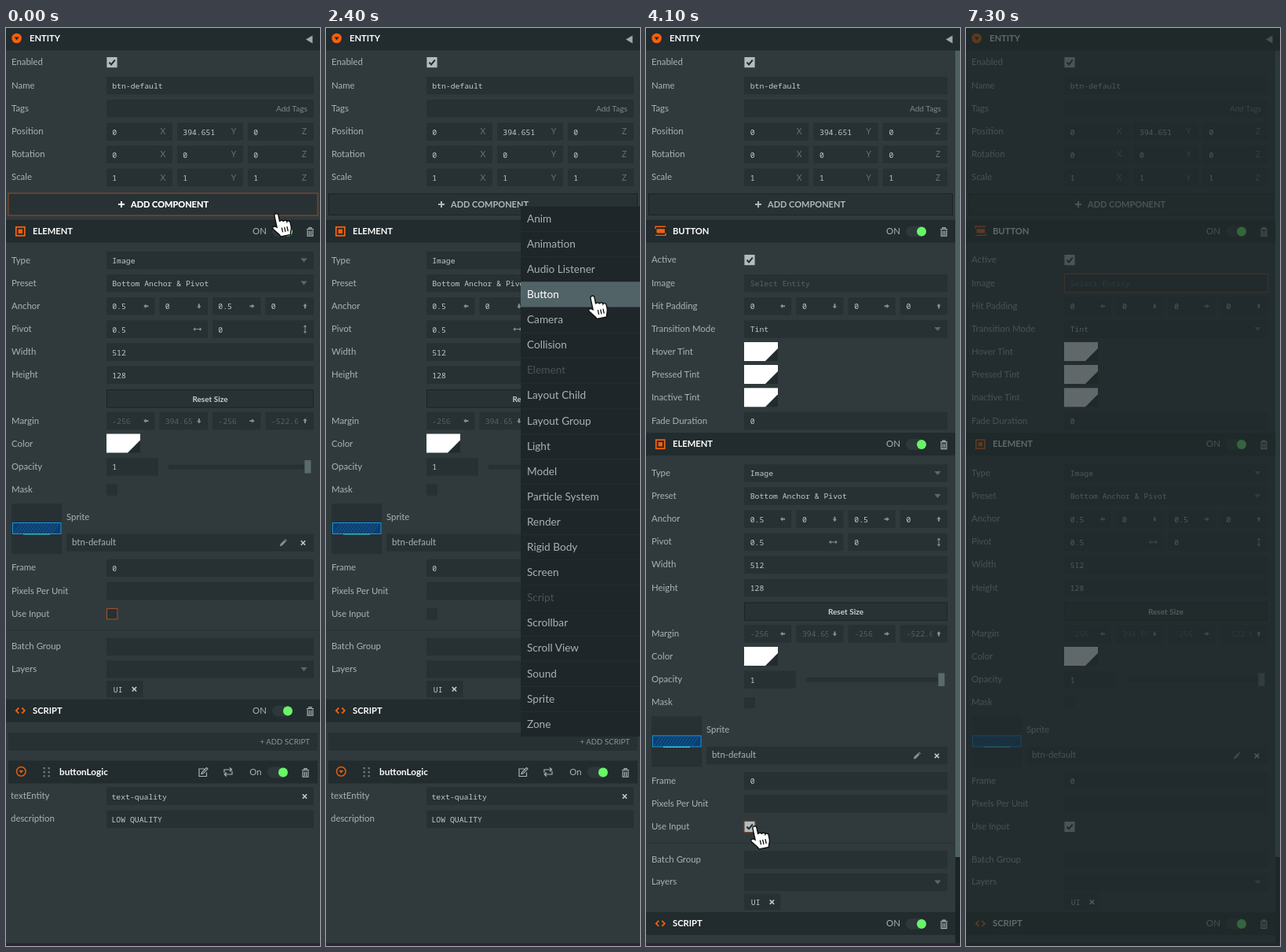
Animation of 400 by 1166 pixels, one loop 8 s. Source, as an HTML page:

```html
<!DOCTYPE html>
<html lang="en">
<head>
<meta charset="utf-8">
<title>Entity inspector</title>
<style>
  html, body { margin: 0; width: 100%; height: 100%; overflow: hidden; background: #303a3d; }
  svg { display: block; }
  text { font: 11.4px Lato, sans-serif; fill: #a9b1b3; white-space: pre; }
  .bold { font-weight: 700; fill: #fff; }
  .title { font-size: 11.2px; }
  .name { font-size: 11.7px; }
  .mono { font: 9.78px "Noto Sans Mono", monospace; fill: #c3cacc; }
  .faint { fill: #566264; }
  .small { font-size: 10.2px; fill: #7d888a; }
  .tiny { font-size: 9.7px; fill: #8b9597; }
  .unit { font-size: 10.5px; fill: #667274; }
  .reset { font-size: 10px; font-weight: 700; fill: #c8ced0; }
  .add { font-size: 11px; font-weight: 700; fill: #b1b8ba; }
  .item { font-size: 13.65px; }
  .off { fill: #485356; }
  .field { fill: #273032; }
  .head { fill: #222b2d; }
  .button { fill: #283234; stroke: #1b2325; }
  .ring { fill: none; stroke: #a4512a; }
  .line { fill: none; stroke: #a9b1b3; stroke-width: 1.2; }
  .plus { stroke: #b1b8ba; stroke-width: 2; }
  .cross { fill: none; stroke: #c3cacc; stroke-width: 1.6; }
  .glyph { fill: #869193; }
  .orange { fill: #f4600c; }
  .orangeLine { fill: none; stroke: #f4600c; stroke-width: 1.8; }
  .thin { stroke-width: 1.4; }
  .drop { fill: #5a6769; }
  .tick { fill: none; stroke: #222b2d; stroke-width: 2; }
  .hot { fill: #fff; }
  .plus.hot { stroke: #fff; }
</style>
</head>
<body>
<svg id="stage" width="400" height="1166" viewBox="0 0 400 1166"></svg>
<script>
const LOOP = 8000, STEP = 100, ROW = 32.1, MENU_TOP = 226;
const ITEMS = ['Anim', 'Animation', 'Audio Listener', 'Button', 'Camera', 'Collision', 'Element',
  'Layout Child', 'Layout Group', 'Light', 'Model', 'Particle System', 'Render', 'Rigid Body',
  'Screen', 'Script', 'Scrollbar', 'Scroll View', 'Sound', 'Sprite', 'Zone'];

const ICON = {
  arrow: 'M-3.2 0L0-2.7V-1H3V1H0V2.7Z',
  both: 'M-5.5 0L-2.8-2.3V-.5H2.8V-2.3L5.5 0L2.8 2.3V.5H-2.8V2.3Z',
  drop: 'M-4.2-2.5H4.2L0 2.5Z',
  cross: 'M-2.7-2.7L2.7 2.7M2.7-2.7L-2.7 2.7',
  trash: 'M-4.5-3.5H4.5M-1.6-3.5V-5.3H1.6V-3.5M-3.4-2.5V5.2H3.4V-2.5M-1.1-1.5V4M1.1-1.5V4',
  pencil: 'M-4.2 4.2L-3.5 1.4L1.4-3.5L3.5-1.4L-1.4 3.5ZM2-4.1L2.9-5L5-2.9L4.1-2Z',
  edit: 'M2-4.5H-5V5H4.5V0M-2 2L-1.5 0L4.5-6L6-4.5L0 1.5Z',
  swap: 'M-5 1V-3H4M2-5.5L4.7-3L2-.5M5-1V3H-4M-2 .5L-4.7 3L-2 5.5',
  code: 'M-2-3.5L-5.5 0L-2 3.5M2-3.5L5.5 0L2 3.5',
  bracket: 'M-6-2V-5.5H6V-2M-6 2V5.5H6V2',
  tick: 'M-3.6 0L-1 2.8L3.8-3',
  plus: 'M-4 0H4M0-4V4',
  hand: 'M-2.3 2C-2.3-.9 2.3-.9 2.3 2V9.8C2.9 8 6.5 8.2 6.5 10.6C7.3 8.8 10.5 9.2 10.5 11.6' +
    'C11.3 10.4 14 11 14 13.4V18C14 22 12 23 11.4 27H0C-1 23.5-4 21-6.6 17.2C-8.6 14.2-5.4 12.4-2.3 15.4Z',
  resize: 'M-14 0L-5-10V-3.2H5V-10L14 0L5 10V3.2H-5V10Z'
};
const TURN = { l: 0, u: 90, r: 180, d: 270, h: 0, v: 90 };

const text = (x, y, s, cls = '', anchor = 'start') =>
  `<text x="${x}" y="${y + 4.1}" class="${cls}" text-anchor="${anchor}">${s}</text>`;
const mono = (x, y, s, cls = '') => text(x, y + .4, s, 'mono ' + cls);
const rect = (x, y, w, h, cls, extra = '') =>
  `<rect x="${x}" y="${y}" width="${w}" height="${h}" class="${cls}" ${extra}/>`;
const icon = (x, y, name, cls, turn = 0) =>
  `<path d="${ICON[name]}" class="${cls}" transform="translate(${x} ${y}) rotate(${turn})"/>`;
const group = (id, body, extra = '') => `<g id="${id}" ${extra}>${body}</g>`;
const toggle = (x, y) => rect(x - 13, y - 6.5, 26, 14, '', 'rx="7" fill="#2c383a"') +
  `<circle cx="${x + 7}" cy="${y + .6}" r="6" fill="#68f567"/>`;
const addLabel = (x, cls = '') => icon(x, 224, 'plus', 'plus ' + cls) +
  text(x + 12, 224, 'ADD COMPONENT', 'add ' + cls);

const SQUARE = y => rect(12.8, y - 5.2, 11, 11, 'orangeLine') + rect(15.6, y - 2.4, 5.4, 5.4, 'orange');
const CODE = y => icon(18.3, y, 'code', 'orangeLine');
const BAR = y => rect(13.5, y - 2.8, 10.5, 5.2, 'orange', 'rx="1"') +
  `<path d="M12 ${y - 3}V${y - 5.8}H25M12 ${y + 5.4}H25V${y + 2.6}" class="orangeLine thin"/>`;

function panel(wide) {
  const L = wide ? 128 : 125, R = wide ? 392 : 384, shift = R - 392, edge = wide ? 400 : 394;
  const textX = L + (wide ? 7.2 : 7.7);

  const field = (y, x = L, r = R) => rect(x, y - 10.6, r - x, 22.4, 'field');
  const label = (y, s, x = 7) => text(x, y, s);
  const value = (y, name, s = '', cls = '') => label(y, name) + field(y) + mono(textX, y, s, cls);
  const select = (y, name, s) => value(y, name, s) + icon(R - 12.5, y + .6, 'drop', 'drop');
  const box = y => rect(L, y - 6.3, 14, 14, 'field');
  const checked = y => rect(L + .4, y - 6, 13.2, 13.2, '', 'fill="#b4bbbd"') + icon(L + 7, y + .6, 'tick', 'tick');
  const swatch = (y, name) => label(y, name) + rect(L, y - 12, 43, 24, 'head') +
    `<path d="M${L} ${y - 12}h43v8l-16 16h-27z" fill="#fff"/>`;

  function cols(y, name, values, marks, cls = '') {
    const n = values.length, w = (R - L - 6.2 * (n - 1)) / n;
    return label(y, name) + values.map((v, i) => {
      const x = L + i * (w + 6.2), m = marks[i], end = x + w;
      const mark = 'XYZ'.includes(m) ? text(end - 12, y + .3, m, 'unit', 'middle')
        : icon(end - (m === 'h' ? 13 : 11), y + .6, 'hv'.includes(m) ? 'both' : 'arrow', 'glyph', TURN[m]);
      return field(y, x, end) +
        `<svg x="${x + textX - L}" y="${y - 11}" width="${w - 27}" height="23">${mono(0, 11, v, cls)}</svg>` + mark;
    }).join('');
  }

  const header = (y, name, mark) => rect(0, y - 14.4, edge, 29, 'head') + mark(y) +
    text(34, y, name, 'bold title') + text(323 + shift, y, 'ON', '', 'middle') +
    toggle(352 + shift, y) + icon(387.5 + shift, y + 1, 'trash', 'line');

  function thumb() {
    let d = '';
    for (let x = 10; x < 60; x += 4) d += `M${x} 642L${x + 9} 629`;
    return rect(7, 604, 64, 64, 'field') +
      rect(8.5, 628.5, 61.5, 14, '', 'fill="#0c3f70" stroke="#1b96dc"') +
      `<path d="${d}" stroke="#1a62a0" stroke-width=".8"/>` +
      '<path d="M22 643H56" stroke="#2fd0c8" stroke-width="1.2"/>';
  }

  const entity = rect(0, 0, 400, 28.5, 'head') +
    '<circle cx="13.6" cy="13" r="6.3" class="orange"/><path d="M10.6 11.4h6l-3 4z" class="head"/>' +
    text(30, 13, 'ENTITY', 'bold title') + '<path d="M382 14.5L390.5 9.5V19.5Z" fill="#a0a9ab"/>' +
    label(43, 'Enabled') + checked(43) +
    value(72.5, 'Name', 'btn-default') +
    value(101.7, 'Tags') + text(R - 8, 101.7, 'Add Tags', 'small', 'end') +
    cols(131, 'Position', ['0', '394.651', '0'], 'XYZ') +
    cols(160, 'Rotation', ['0', '0', '0'], 'XYZ') +
    cols(189.2, 'Scale', ['1', '1', '1'], 'XYZ') +
    rect(3.5, 210.5, edge - 7, 27, 'button') + addLabel(147 + shift / 2);

  const button = header(258, 'BUTTON', BAR) +
    label(294, 'Active') + checked(294) +
    value(323.5, 'Image', 'Select Entity', 'faint') +
    cols(352.7, 'Hit Padding', ['0', '0', '0', '0'], 'ldru') +
    select(381.8, 'Transition Mode', 'Tint') +
    swatch(411, 'Hover Tint') + swatch(440, 'Pressed Tint') + swatch(469.2, 'Inactive Tint') +
    value(498.4, 'Fade Duration', '0');

  const sliderX = L + 79;
  const element = header(258, 'ELEMENT', SQUARE) +
    select(294.5, 'Type', 'Image') +
    select(323.5, 'Preset', 'Bottom Anchor &amp; Pivot') +
    cols(352.7, 'Anchor', ['0.5', '0', '0.5', '0'], 'ldru') +
    cols(382, 'Pivot', ['0.5', '0'], 'hv') +
    value(411, 'Width', '512') + value(440.2, 'Height', '128') +
    rect(L + .5, 459.5, R - L - 1, 22.5, 'button') +
    text((L + R) / 2, 470.4, 'Reset Size', 'reset', 'middle') +
    cols(498.4, 'Margin', ['-256', '394.651', '-256', '-522.651'], 'ldru', 'faint') +
    swatch(527.6, 'Color') +
    label(556.8, 'Opacity') + field(556.8, L, L + 66) + mono(textX, 556.8, '1') +
    rect(sliderX, 554.5, R - 4 - sliderX, 6, 'field') + rect(R - 11.6, 549, 8, 16.5, '', 'fill="#5a6b6e"') +
    label(586, 'Mask') + box(586) +
    thumb() + text(77, 621, 'Sprite') + field(653, 77) + text(84, 653, 'btn-default') +
    icon(353 + shift, 654, 'pencil', 'glyph') + icon(378.5 + shift, 654, 'cross', 'cross') +
    value(685.3, 'Frame', '0') + value(714.4, 'Pixels Per Unit') +
    label(743.5, 'Use Input') + box(743.5) +
    (wide ? group('ringA', rect(L + .5, 737.5, 13.4, 13.4, 'ring'))
      : group('check', checked(743.5)) + group('ringB', rect(L, 737, 14.2, 14.2, 'ring', 'stroke-opacity=".6"'))) +
    rect(0, 764.5, edge, 1, 'field') +
    value(785.3, 'Batch Group') + select(814, 'Layers', '') +
    rect(L, 829, 46.5, 21, 'field') + mono(L + 8.8, 839.4, 'UI') + icon(L + 35.4, 839.8, 'cross', 'cross') +
    header(867, 'SCRIPT', CODE);

  if (!wide) {
    return rect(394, 28.5, 6, 1134, '', 'fill="#1b2326"') + rect(394, 28.5, 6, 1024.5, '', 'fill="#4f6063"') +
      entity + button + `<g transform="translate(0 270.4)">${element}</g>` +
      group('preset', mono(textX, 593.9, 'Bottom Anchor &amp; Pivot', 'hot')) +
      group('anchorHot', rect(166, 615, 17, 17, 'field') + icon(174.5, 623.5, 'bracket', 'line') +
        icon(174.5, 623.5, 'both', 'glyph')) +
      group('widthHot', icon(373, 682, 'bracket', 'line') + icon(373, 682, 'both', 'hot')) +
      group('imageRing', rect(L + .5, 312.5, R - L - .5, 23, 'ring'));
  }

  let dots = '';
  for (let i = 0; i < 6; i++) dots += rect(47.5 + i % 2 * 6, 939 + (i >> 1) * 5, 2.4, 2.4, '', 'fill="#6b7779"');
  return entity + group('addRing', rect(3, 210, 394, 28, 'ring')) + group('addHot', addLabel(147, 'hot')) +
    element + rect(3, 895, 394, 23, 'field') + text(387, 906.3, '+ ADD SCRIPT', 'tiny', 'end') +
    rect(3, 930.5, 394, 29, 'head') +
    '<circle cx="19.3" cy="944.3" r="5.8" class="orangeLine thin"/>' +
    '<path d="M16.4 943h5.8l-2.9 3.6z" class="orange"/>' + dots +
    text(68, 945, 'buttonLogic', 'bold name') + icon(251, 945.5, 'edit', 'line') + icon(283, 945, 'swap', 'line') +
    text(318, 945, 'On', '', 'middle') + toggle(346, 945) + icon(381.5, 946, 'trash', 'line') +
    label(975, 'textEntity', 6) + field(975) + mono(134.5, 975.3, 'text-quality') + icon(380.5, 976, 'cross', 'cross') +
    label(1004.3, 'description', 6) + field(1004.3) + mono(134.5, 1004.6, 'LOW QUALITY');
}

const menu = rect(248, MENU_TOP, 152, ROW * ITEMS.length, '', 'fill="#1e2629"') +
  ITEMS.map((s, i) => rect(248, MENU_TOP + ROW * i, 152, .8, '', 'fill="#262f32"')).join('') +
  rect(248, MENU_TOP, 152, ROW, '', 'id="bar" fill="#516367"') +
  ITEMS.map((s, i) => text(256, MENU_TOP + ROW * (i + .5) + .6, s,
    'item' + (s === 'Element' || s === 'Script' ? ' off' : ''))).join('');

const cursor =
  group('hand', `<path d="${ICON.hand}" fill="#fff" stroke="#111" stroke-width="1.3"/>` +
    '<path d="M3.2 17V22.5M6.3 17V22.5M9.4 17V22.5" stroke="#111" stroke-width="1.2"/>',
    'transform="rotate(-12) scale(1.1)"') +
  group('resize', `<path d="${ICON.resize}" fill="#111" stroke="#fff" stroke-width="2"/>`);

const $ = id => document.getElementById(id);
$('stage').innerHTML = rect(0, 0, 400, 1166, '', 'fill="#303a3d"') +
  group('before', panel(true)) + group('after', panel(false)) +
  rect(0, 1162.5, 400, 3.5, '', 'fill="#2b2531"') + group('menu', menu) +
  rect(0, 0, 400, 1166, '', 'id="dim" fill="#1f292a"') + group('cursor', cursor);
const itemNodes = [...document.querySelectorAll('.item')];

const clamp = v => Math.min(1, Math.max(0, v));
const ease = v => (v = clamp(v), v * v * (3 - 2 * v));
const mix = (a, b, u) => a + (b - a) * u;
const bend = (a, c, b, u) => mix(mix(a, c, u), mix(c, b, u), u);
const show = (id, on) => { $(id).style.opacity = +on; };
const within = (t, a, b) => t >= a && t < b;

// Rows whose number fields use the drag cursor
const DRAG_ROWS = [[343, 367], [484, 513], [609, 726], [941, 1000]];

function pointer(t) {
  if (t < 2500) {
    const u = ease((t - 1500) / 900);
    return [mix(344, 339, u), mix(236, 340.5, u)];
  }
  if (t < 4475) {
    const u = ease((t - 2600) / 1200);
    return [bend(339, 117.5, 138, u), bend(340.5, 592.5, 1014, u)];
  }
  const u = ease((t - 4475) / 1200);
  return [mix(138, 331, u), mix(1014, 326, u)];
}

function draw(t) {
  const [x, y] = pointer(t), swapped = t >= 2500;
  show('before', !swapped);
  show('after', swapped);
  show('menu', within(t, 1100, 2500));
  show('ringA', clamp((400 - t) / 300));
  show('addRing', t < 1100);
  show('addHot', t < 1700);

  const hot = Math.floor((y - MENU_TOP) / ROW);
  $('bar').setAttribute('y', MENU_TOP + hot * ROW);
  itemNodes.forEach((n, i) => n.classList.toggle('hot', i === hot));

  show('check', t >= 4100);
  show('ringB', within(t, 4100, 5700));
  show('preset', within(t, 3100, 3300));
  show('anchorHot', within(t, 3200, 3300) * .6);
  show('widthHot', within(t, 5000, 5200));
  show('imageRing', (t >= 5700) * .8);
  show('dim', .7 * clamp((t - 5700) / 300));

  const drag = swapped && DRAG_ROWS.some(([a, b]) => within(y, a, b));
  show('hand', !drag);
  show('resize', drag);
  show('cursor', clamp((6500 - t) / 300));
  $('cursor').setAttribute('transform', `translate(${x} ${y})`);
}

function tick() {
  draw(Math.floor(performance.now() % LOOP / STEP) * STEP);
  requestAnimationFrame(tick);
}
tick();
</script>
</body>
</html>
```
